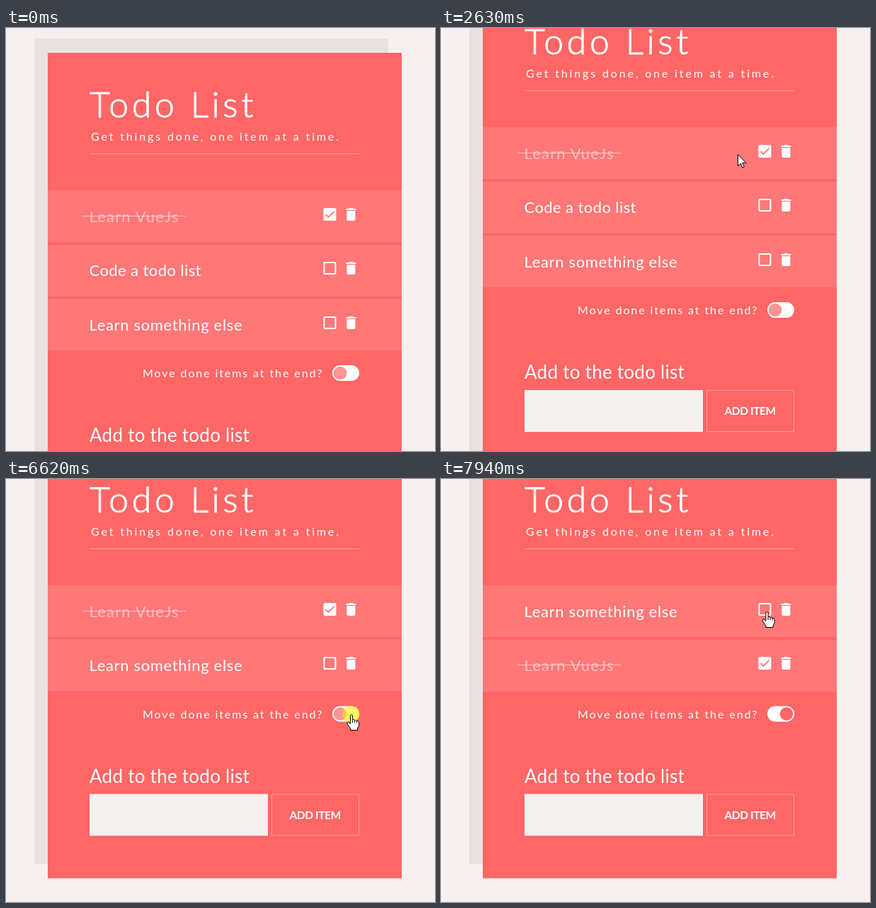
An HTML page for the animation above (8 s loop, 606x597 px).

```html
<!DOCTYPE html>
<html lang="en">
<head>
<meta charset="utf-8">
<title>Todo List</title>
<style>
  html, body { margin: 0; width: 100%; height: 100%; overflow: hidden; background: #f6f1f0; }
  svg { display: block; width: 100vw; height: 100vh; }
  text { font-family: Quicksand, Lato, sans-serif; fill: #fff; white-space: pre; }
  .title { font-size: 50px; font-weight: 300; letter-spacing: 4.6px; stroke: #fff; stroke-width: .9; }
  .sub { font-size: 16px; letter-spacing: 2.85px; }
  .item { font-size: 22px; }
  .option { font-size: 16px; letter-spacing: 1.9px; }
  .add { font-size: 26px; letter-spacing: .26px; }
  .button { font-size: 15.5px; font-weight: 700; letter-spacing: -.4px; }
  .icon { fill: #fff; }
  .tick { fill: none; stroke: #f66; stroke-width: 1.6; }
  .cursor path { fill: #fff; stroke: #000; stroke-width: 1; stroke-linejoin: round; }
</style>
</head>
<body>
<svg viewBox="0 0 606 597" preserveAspectRatio="xMidYMid meet">
  <rect width="606" height="597" fill="#f6f1f0"/>
  <g id="page">
    <rect id="shadow" x="40" y="15" width="500" fill="#e7e2e1"/>
    <rect id="card" x="59" y="35" width="500" fill="#f66"/>
    <text class="title" x="118" y="126">Todo List</text>
    <text class="sub" x="120" y="159">Get things done, one item at a time.</text>
    <path d="M118 177.5H499" stroke="#fff" stroke-opacity=".4"/>
    <g id="rows"></g>
    <g id="footer">
      <text class="option" x="193" y="493">Move done items at the end?</text>
      <rect x="461" y="476" width="38" height="22" rx="11" fill="#fff"/>
      <circle id="knob" cy="487" r="9.3"/>
      <text class="add" x="118" y="584">Add to the todo list</text>
      <rect x="118" y="600" width="252" height="59" fill="#f5f1f0"/>
      <rect x="375.5" y="600.5" width="123" height="58" fill="none" stroke="#fff" stroke-opacity=".35"/>
      <text class="button" x="400.5" y="635">ADD ITEM</text>
    </g>
  </g>
  <circle id="press" r="12" fill="#fe0" fill-opacity=".6"/>
  <g id="arrow" class="cursor">
    <path d="M.5 .5V16.5L4.3 13L7 19L9.4 18L6.8 12.2H11.8Z"/>
  </g>
  <g id="hand" class="cursor">
    <path d="M-1.6 1.6Q0 -.6 1.6 1.6V7.6Q3.4 6.8 4.6 8.5Q6.5 7.6 7.6 9.4Q10.4 8.8 10.6 11.6V15.8L8.6 20V22.5H-1.6V20.2L-5.8 13.8Q-7 11 -4.4 11L-1.6 13.4Z"/>
    <path d="M1.6 7.6V12M4.6 8.5V12M7.6 9.4V12.4"/>
  </g>
</svg>
<script>
const LOOP = 8000, ROW_TOP = 229, ROW_H = 73, PITCH = 76.5;
const REMOVED = 5400, TOGGLED = 6720;
const $ = id => document.getElementById(id);

const ICON = {
  blank: 'M19 5v14H5V5h14m0-2H5c-1.1 0-2 .9-2 2v14c0 1.1.9 2 2 2h14c1.1 0 2-.9 2-2V5c0-1.1-.9-2-2-2z',
  filled: 'M19 3H5c-1.1 0-2 .9-2 2v14c0 1.1.9 2 2 2h14c1.1 0 2-.9 2-2V5c0-1.1-.9-2-2-2z',
  tick: 'M6 12L10 15.9L18.2 7.7',
  trash: 'M6 19c0 1.1.9 2 2 2h8c1.1 0 2-.9 2-2V7H6v12zM19 4h-3.5l-1-1h-5l-1 1H5v2h14V4z'
};

const items = [
  { text: 'Learn VueJs', spacing: 1.2, line: 146 },
  { text: 'Code a todo list', spacing: .42, line: 178 },
  { text: 'Learn something else', spacing: .67, line: 235 }
];

// Cursor stops: time, x, y
const stops = [
  [30, 598, 588], [320, 386, 365], [470, 386, 365], [1210, 167, 117],
  [1310, 167, 117], [2100, 385, 180], [2400, 385, 180], [2880, 457, 176],
  [3540, 457, 176], [3560, 457.5, 177], [4150, 457.5, 177], [4580, 457, 248],
  [4750, 457, 248], [4970, 486, 247], [5820, 486, 247], [6210, 487.5, 332],
  [7220, 487.5, 332], [7430, 458, 248], [7920, 460, 187]
];
const presses = [[2940, 3040], [3830, 3930], [4640, 4740], [5300, 5380], [6620, 6720]];

const clamp = v => Math.min(1, Math.max(0, v));
const phase = (t, start, length) => clamp((t - start) / length);
const smooth = p => p * p * (3 - 2 * p);

// CSS "ease": cubic-bezier(.25, .1, .25, 1)
function ease(p) {
  const curve = (u, a, b) => 3 * a * u * (1 - u) ** 2 + 3 * b * u * u * (1 - u) + u ** 3;
  let lo = 0, hi = 1;
  for (let i = 0; i < 24; i++) {
    const mid = (lo + hi) / 2;
    if (curve(mid, .25, .25) < p) lo = mid; else hi = mid;
  }
  return curve(hi, .1, 1);
}

$('rows').innerHTML = items.map(item => `
  <g>
    <rect class="band" x="59" width="500" height="${ROW_H}" fill="#fff" fill-opacity=".115"/>
    <text class="item" x="117.5" y="45" letter-spacing="${item.spacing}">${item.text}</text>
    <rect class="strike" x="108" y="36" height="1" fill="#fff" fill-opacity=".55"/>
    <g transform="translate(445.4 22)">
      <path class="icon box"/>
      <path class="tick" d="${ICON.tick}"/>
      <path class="icon" transform="translate(30 0)" d="${ICON.trash}"/>
    </g>
  </g>`).join('');

items.forEach((item, i) => {
  item.node = $('rows').children[i];
  const find = selector => item.node.querySelector(selector);
  item.band = find('.band');
  item.label = find('text');
  item.strike = find('.strike');
  item.box = find('.box');
  item.tick = find('.tick');
});

function cursorAt(t) {
  const next = stops.findIndex(s => s[0] > t);
  if (next < 0) return stops[stops.length - 1].slice(1);
  if (next === 0) return stops[0].slice(1);
  const [t0, x0, y0] = stops[next - 1], [t1, x1, y1] = stops[next];
  const p = smooth(phase(t, t0, t1 - t0));
  return [x0 + (x1 - x0) * p, y0 + (y1 - y0) * p];
}

function doneAmounts(t) {
  const first = t < 3700 ? 1 - ease(phase(t, 3040, 350)) : ease(phase(t, 3930, 320));
  return [first, ease(phase(t, 4740, 260)), 0];
}

const show = (node, on) => node.setAttribute('display', on ? 'inline' : 'none');
const move = (node, x, y) => node.setAttribute('transform', `translate(${x} ${y})`);

function render(t) {
  const removed = t >= REMOVED;
  const scroll = removed ? 79 : 89 * smooth(phase(t, 2130, 275));
  const swap = ease(phase(t, TOGGLED, 970));
  const slots = removed ? [swap, -1, 1 - swap] : [0, 1, 2];
  const tops = slots.map(s => ROW_TOP + s * PITCH);
  const done = doneAmounts(t);
  const checked = [t < 3040 || t >= 3930, t >= 4740, false];
  const lift = removed ? PITCH : 0;

  move($('page'), 0, -scroll);
  $('card').setAttribute('height', 684 - lift);
  $('shadow').setAttribute('height', 684 - lift);
  move($('footer'), 0, -lift);

  items.forEach((item, i) => {
    const top = Math.floor(tops[i]);
    show(item.node, slots[i] >= 0);
    move(item.node, 0, top);
    item.band.setAttribute('y', Math.round(tops[i]) - top);
    item.label.setAttribute('opacity', 1 - .5 * done[i]);
    item.strike.setAttribute('width', item.line * done[i]);
    item.box.setAttribute('d', checked[i] ? ICON.filled : ICON.blank);
    show(item.tick, checked[i]);
  });

  const on = ease(phase(t, TOGGLED, 300));
  const tint = Math.round(148 - 46 * on);
  $('knob').setAttribute('cx', 472 + 16 * on);
  $('knob').setAttribute('fill', `rgb(255,${tint},${tint})`);

  const [x, y] = cursorAt(t), pageY = y + scroll;
  const overIcon = (x > 446 && x < 468 || x > 478 && x < 496) &&
    tops.some((top, i) => slots[i] >= 0 && pageY > top + 22 && pageY < top + 46);
  const overToggle = x > 461 && x < 499 && Math.abs(pageY + lift - 487) < 11;
  const pointing = overIcon || overToggle;
  show($('hand'), t >= 30 && pointing);
  show($('arrow'), t >= 30 && !pointing);
  move($('hand'), x + .5, y);
  move($('arrow'), x, y);
  move($('press'), x, y);
  show($('press'), presses.some(([a, b]) => t >= a && t < b));
}

const start = performance.now();
function tick() {
  render((performance.now() - start) % LOOP);
  requestAnimationFrame(tick);
}
render(0);
requestAnimationFrame(tick);
</script>
</body>
</html>
```
